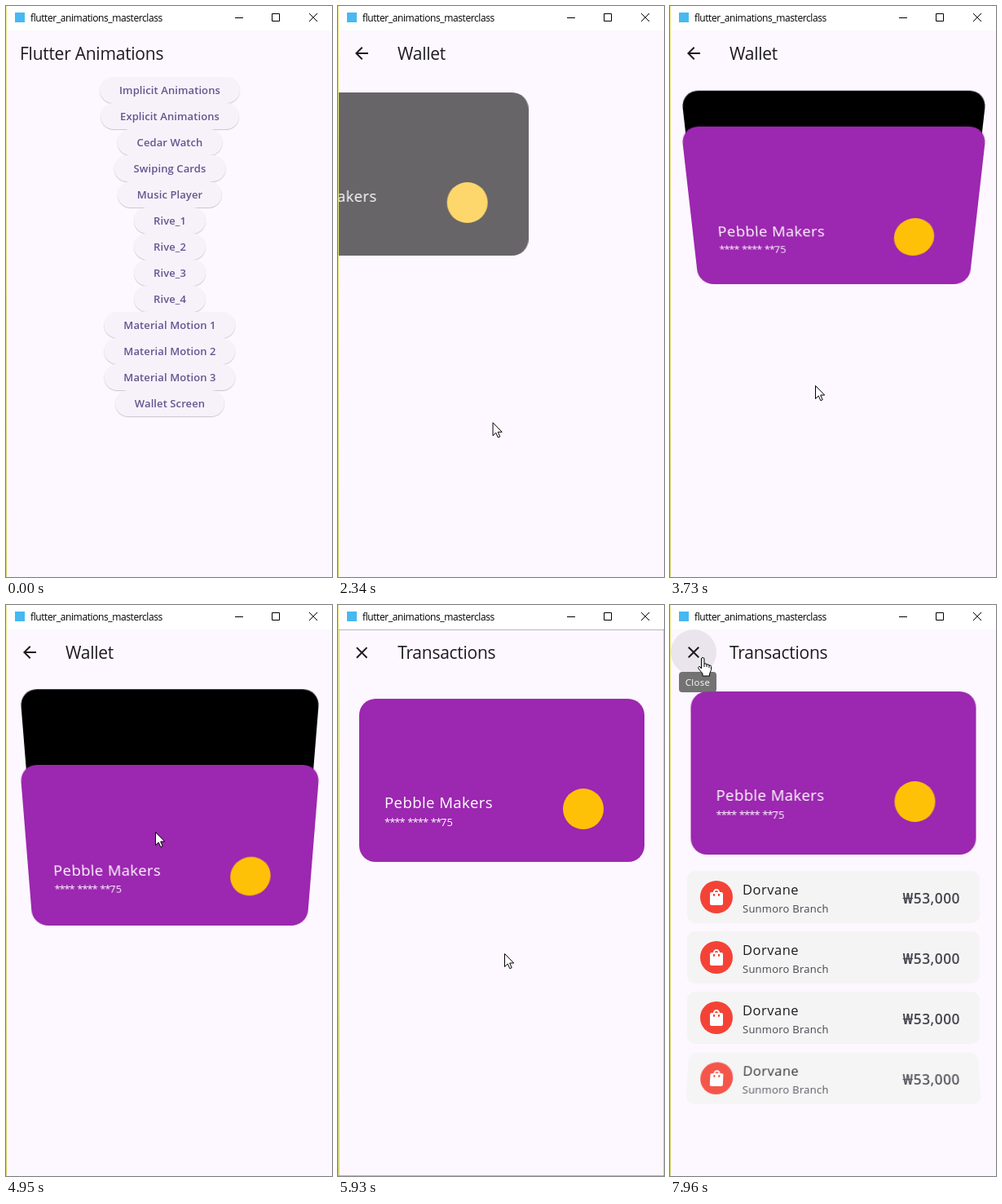
An HTML page that plays this animation: 400x700 px, repeating every 8 s.

```html
<!DOCTYPE html>
<html lang="en">
<head>
<meta charset="utf-8">
<title>Wallet animation</title>
<style>
html, body { margin: 0; width: 100%; height: 100%; overflow: hidden; }
body { position: relative; background: #fff; color: #1d1b20; font-family: "Open Sans", "Noto Sans", sans-serif; }
div, svg { position: absolute; }
div { white-space: nowrap; }
#edge { left: 0; top: 0; width: 1px; height: 700px; background: linear-gradient(#eee88a, #cfcf62); }
#logo { left: 11px; top: 8px; width: 12px; height: 12px; background: #47b8f2; }
#caption { left: 30px; top: 0; font-size: 12px; line-height: 29px; letter-spacing: -.4px; color: #000; }
#client { left: 1px; top: 30px; width: 399px; height: 670px; overflow: hidden; background: #fdf7ff; }
.page { inset: 0; background: #fdf7ff; }
#shade { inset: 0; background: #000; }
.heading { left: 72px; top: 0; font-size: 21px; line-height: 57px; letter-spacing: -.25px; }
.icon { left: 16px; top: 16px; fill: #1d1b20; }
.button { left: 200px; transform: translateX(-50%); height: 32px; padding: 0 24px; border-radius: 16px; overflow: hidden;
  background: #f7f2fa; color: #65558f; font: 600 13px/32px "Open Sans", "Noto Sans", sans-serif; letter-spacing: .1px;
  box-shadow: 0 1px 1px rgba(0,0,0,.2); }
.button.hover { background: #e9e2ec; box-shadow: 0 1px 3px rgba(0,0,0,.35); }
#ripple { border-radius: 50%; background: #65558f; }
.card { left: 25px; width: 350px; height: 200px; border-radius: 20px; color: #fff; transform-origin: 50% 110px; }
.owner { left: 31px; top: 113px; font-size: 18.6px; font-weight: 500; line-height: 28px; letter-spacing: .4px; }
.digits { left: 31px; top: 141px; font-size: 13px; font-weight: 500; line-height: 20px; }
.stars { letter-spacing: -1px; word-spacing: 1.3px; }
.badge { left: 250px; top: 110px; width: 50px; height: 50px; border-radius: 50%; background: #ffc107; }
.tile { left: 20px; width: 359px; height: 64px; border-radius: 10px; background: #f4f4f4; transform-origin: 50% 37px; }
.bag { left: 16px; top: 12px; width: 40px; height: 40px; border-radius: 50%; background: #f44336; }
.bag svg { left: 8px; top: 8px; fill: #fff; }
.shop { left: 68px; top: 11px; font-size: 16.5px; line-height: 24px; letter-spacing: .5px; }
.branch { left: 68px; top: 36px; font-size: 13px; line-height: 20px; letter-spacing: .25px; color: #49454f; }
.price { right: 24px; top: 20px; font-size: 17.4px; font-weight: 600; line-height: 26px; letter-spacing: .5px; color: #49454f; }
#halo { left: 0; top: 0; width: 56px; height: 56px; border-radius: 50%; background: rgba(73,69,79,.1); }
#tip { left: 10px; top: 52px; width: 46px; height: 25px; border-radius: 4px; background: rgba(97,97,97,.88); color: #fff;
  font-size: 11.4px; font-weight: 500; line-height: 26px; letter-spacing: .3px; text-align: center; }
#press { left: -13px; top: -13px; width: 26px; height: 26px; border-radius: 50%; background: rgba(250,236,0,.62); }
#pointer { left: 0; top: 0; }
#pointer svg { left: 0; top: 0; overflow: visible; fill: #fff; stroke: #000; stroke-linejoin: round; }
</style>
</head>
<body>
<div id="logo"></div>
<div id="caption">flutter_animations_masterclass</div>
<svg width="400" height="30" fill="none" stroke="#000"><path d="M281 14.5h10M326.5 9.5h9v9h-9zM372 9l10 10M382 9l-10 10"/></svg>
<div id="client">
  <div class="page" id="menu"><div class="heading" style="left:16px">Flutter Animations</div></div>
  <div class="page" id="wallet">
    <svg class="icon" width="24" height="24"><path d="M20 11H7.83l5.59-5.59L12 4l-8 8 8 8 1.41-1.41L7.83 13H20z"/></svg>
    <div class="heading">Wallet</div>
    <div class="card" id="black" style="top:76px;background:#000"></div>
  </div>
  <div id="shade"></div>
  <div class="page" id="detail">
    <div id="halo"></div>
    <svg class="icon" width="24" height="24"><path d="M19 6.41L17.59 5 12 10.59 6.41 5 5 6.41 10.59 12 5 17.59 6.41 19 12 13.41 17.59 19 19 17.59 13.41 12z"/></svg>
    <div class="heading">Transactions</div>
  </div>
  <div class="card" id="purple" style="top:296px;background:#9c27b0"></div>
  <div id="tip">Close</div>
</div>
<div id="edge"></div>
<div id="pointer">
  <div id="press"></div>
  <svg id="arrow" width="13" height="20"><path d="M.5.5v16l3.7-3.6 2.6 5.8 2.4-1-2.5-5.7h5z"/></svg>
  <svg id="hand" width="18" height="24"><path transform="translate(-6)" d="M4.5 14V2q0-1.5 1.7-1.5T8 2v6q3-.8 3 1 2.5-.8 3 1 2.5-.5 2.5 1.5v4l-2 5v2.5H6V20L1 14q-1-2 .5-2.5T4.5 14zM8 8v4M11 9v3M14 10v3"/></svg>
</div>
<script>
const LOOP = 8000, PUSH_WALLET = 1900, PUSH_DETAIL = 5705;
const $ = id => document.getElementById(id);
const clamp = x => Math.min(1, Math.max(0, x));
const part = (t, start, length = 300) => clamp((t - start) / length);
const show = (el, on) => { el.style.visibility = on ? 'visible' : 'hidden'; };

function bezier(x1, y1, x2, y2) {
  const at = (a, b, s) => 3 * a * s * (1 - s) ** 2 + 3 * b * s * s * (1 - s) + s ** 3;
  return x => {
    let lo = 0, hi = 1;
    for (let i = 0; i < 24; i++) {
      const mid = (lo + hi) / 2;
      if (at(x1, x2, mid) < x) lo = mid; else hi = mid;
    }
    return x <= 0 ? 0 : x >= 1 ? 1 : at(y1, y2, lo);
  };
}
const heroCurve = bezier(.4, 0, .2, 1), moveCurve = bezier(.4, 0, .4, 1);
const zoomIn = bezier(.05, 0, .133333, .06), zoomOut = bezier(.208333, .82, .25, 1);
const zoom = p => p < 1 / 6 ? .4 * zoomIn(p * 6) : .4 + .6 * zoomOut((p - 1 / 6) * 1.2);

const labels = ['Implicit Animations', 'Explicit Animations', 'Cedar Watch', 'Swiping Cards', 'Music Player',
  'Rive_1', 'Rive_2', 'Rive_3', 'Rive_4', 'Material Motion 1', 'Material Motion 2', 'Material Motion 3', 'Wallet Screen'];
$('menu').innerHTML += labels.map((s, i) => `<div class="button" style="top:${57 + 32 * i}px">${s}</div>`).join('');
const button = $('menu').lastChild;
button.innerHTML += '<div id="ripple"></div>';

for (const id of ['black', 'purple'])
  $(id).innerHTML = `<div class="owner">Pebble Makers</div>
    <div class="digits"><span class="stars">**** **** **</span>75</div><div class="badge"></div>`;

const bag = 'M18 6h-2c0-2.21-1.79-4-4-4S8 3.79 8 6H6c-1.1 0-2 .9-2 2v12c0 1.1.9 2 2 2h12c1.1 0 2-.9 2-2V8c0-1.1-.9-2-2-2zm-8 4c0 .55-.45 1-1 1s-1-.45-1-1V8h2v2zm2-6c1.1 0 2 .9 2 2h-4c0-1.1.9-2 2-2zm4 6c0 .55-.45 1-1 1s-1-.45-1-1V8h2v2z';
const tiles = [0, 1, 2, 3].map(i => {
  const tile = document.createElement('div');
  tile.className = 'tile';
  tile.style.top = 296 + 74 * i + 'px';
  tile.innerHTML = `<div class="bag"><svg width="24" height="24"><path d="${bag}"/></svg></div>
    <div class="shop">Dorvane</div><div class="branch">Sunmoro Branch</div><div class="price">₩53,000</div>`;
  return $('detail').appendChild(tile);
});

// Pointer path: time, x, y
const path = [[590, 400, 659], [1150, 201, 490], [2100, 201, 490], [2450, 188, 513], [3310, 188, 513], [3410, 178, 465],
  [4130, 178, 465], [4550, 183, 278], [5170, 183, 278], [5510, 204, 427], [7290, 204, 427], [7750, 40, 64], [LOOP, 40, 64]];
const presses = [[1810, 1890], [3310, 3410], [4810, 4860], [5590, 5660]];

function drawPointer(t) {
  const i = Math.max(1, path.findIndex(k => k[0] > t));
  const [t0, x0, y0] = path[i - 1], [t1, x1, y1] = path[i];
  const p = moveCurve(part(t, t0, t1 - t0));
  $('pointer').style.transform = `translate(${x0 + (x1 - x0) * p}px, ${y0 + (y1 - y0) * p}px)`;
  const hand = t > 1110 && t < 2000 || t > 7690;
  show($('arrow'), t >= 590 && !hand);
  show($('hand'), hand);
  show($('press'), presses.some(([a, b]) => t >= a && t < b));
}

function drawMenu(t) {
  button.classList.toggle('hover', t > 1110);
  const r = 19 + Math.max(0, t - 1810) * .25;
  Object.assign($('ripple').style, {
    left: 68 - r + 'px', top: 18 - r + 'px', width: 2 * r + 'px', height: 2 * r + 'px',
    opacity: t < 1810 ? 0 : .1 * (1 - part(t, 1900, 200))
  });
}

function drawPages(t) {
  const enter = (el, p) => {
    show(el, p > 0);
    el.style.opacity = part(p, .125, .125);
    el.style.transform = `scale(${.85 + .15 * zoom(p)})`;
  };
  const leave = (el, p) => { el.style.transform = `scale(${1 + .05 * zoom(p)})`; };
  const p = part(t, PUSH_WALLET), q = part(t, PUSH_DETAIL);
  leave($('menu'), p);
  enter($('wallet'), p);
  if (q > 0) leave($('wallet'), q);
  enter($('detail'), q);
  const dim = q > 0 ? q : p < 1 ? p : 0;
  $('shade').style.opacity = .6 * part(dim, .2075, .21);
  $('client').insertBefore($('shade'), q > 0 ? $('detail') : $('wallet'));
}

function drawCards(t) {
  const fold = t < 4867 ? part(t, 3410) : 1 - part(t, 4867);
  const flight = part(t, PUSH_DETAIL);
  ['black', 'purple'].forEach((id, i) => {
    const p = part(t, 2162 + 500 * i);
    const x = -350 * (1 - p) - (i && flight === 1 ? .5 : 0);
    const y = i * (-176 * fold - 220 * heroCurve(flight));
    $(id).style.opacity = p;
    $(id).style.transform = `translate(${x}px, ${y}px) perspective(500px) rotateX(${-18 * fold}deg)`;
  });
}

function drawDetail(t) {
  tiles.forEach((tile, i) => {
    const p = part(t, 6190 + 500 * i);
    tile.style.opacity = p;
    tile.style.transform = p < 1 ? `perspective(500px) rotateX(${90 * (1 - p)}deg)` : 'none';
  });
  $('halo').style.opacity = part(t, 7690, 50);
  $('tip').style.opacity = part(t, 7720, 150);
}

let start;
function frame(now) {
  start ??= now;
  const t = (now - start) % LOOP;
  drawMenu(t);
  drawPages(t);
  drawCards(t);
  drawDetail(t);
  drawPointer(t);
  requestAnimationFrame(frame);
}
requestAnimationFrame(frame);
</script>
</body>
</html>
```
